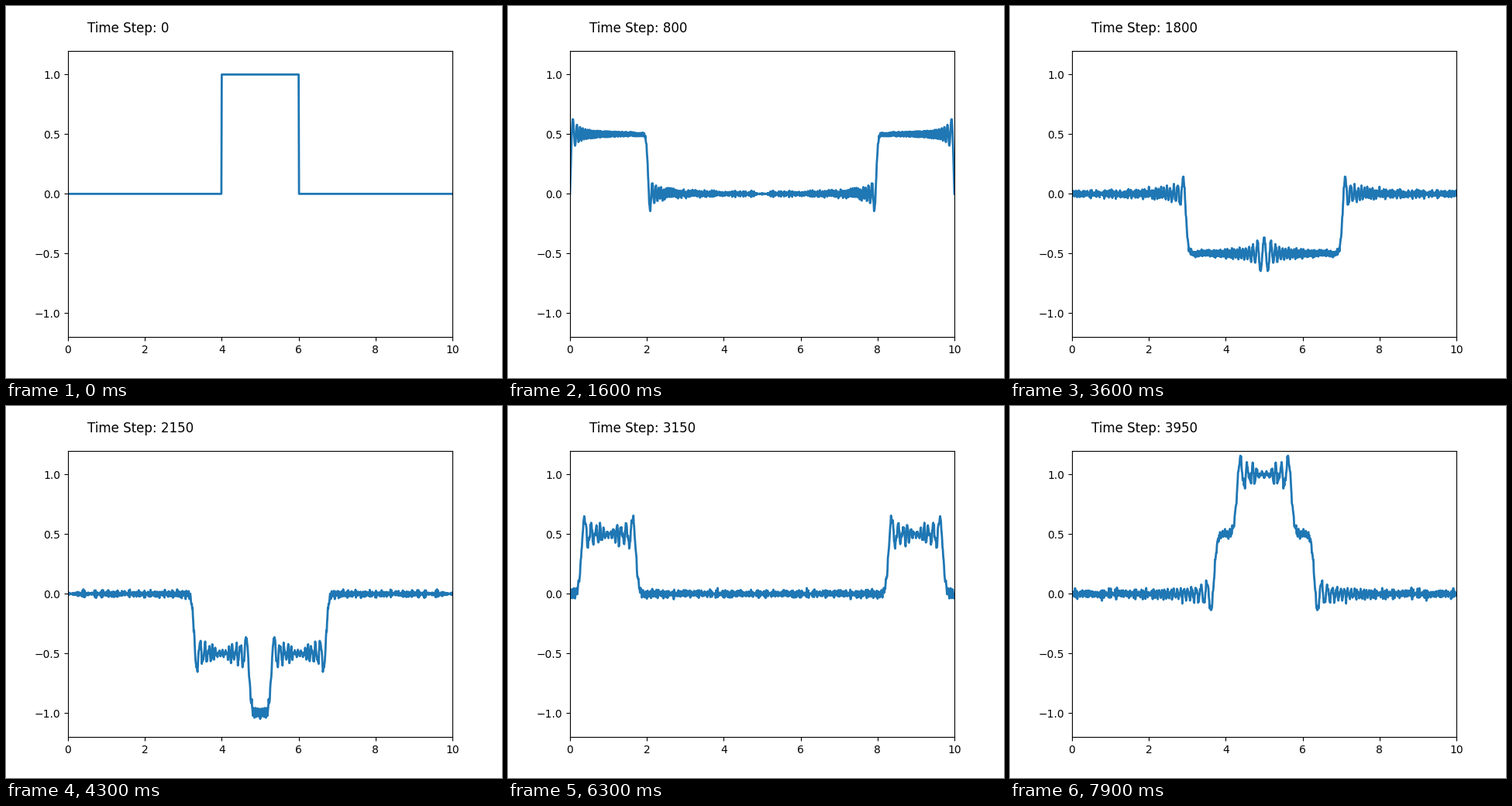
These frames come from a looping animation (640x480 px, 8000 ms). A matplotlib script:

```python
import numpy as np
import matplotlib.pyplot as plt
from matplotlib.animation import FuncAnimation

LENGTH = 10.0
NX = 1001
SPEED = 1.0
DT = 0.005
FRAMES = 80
STRIDE = 50  # time steps per drawn frame

x = np.linspace(0, LENGTH, NX)
courant2 = (SPEED * DT / (x[1] - x[0])) ** 2


def laplacian(u):
    """Second difference, zero at the fixed ends."""
    d = np.zeros_like(u)
    d[1:-1] = u[2:] - 2 * u[1:-1] + u[:-2]
    return d


def solve():
    """Leapfrog solution of the wave equation, one row per drawn frame."""
    u = np.where((x >= 4) & (x <= 6), 1.0, 0.0)
    nxt = u + 0.5 * courant2 * laplacian(u)
    rows = []
    for step in range(FRAMES * STRIDE):
        if step % STRIDE == 0:
            rows.append(u)
        u, nxt = nxt, 2 * nxt - u + courant2 * laplacian(nxt)
    return rows


waves = solve()

fig, ax = plt.subplots(figsize=(6.4, 4.8), dpi=100)
ax.set_xlim(0, LENGTH)
ax.set_ylim(-1.2, 1.2)
line, = ax.plot(x, waves[0], lw=2)
label = ax.text(0.5, 1.35, "", fontsize=12)


def update(i):
    line.set_ydata(waves[i])
    label.set_text(f"Time Step: {i * STRIDE}")
    return line, label


anim = FuncAnimation(fig, update, frames=FRAMES, interval=100,
                     repeat=True, repeat_delay=0)
plt.show()
```
